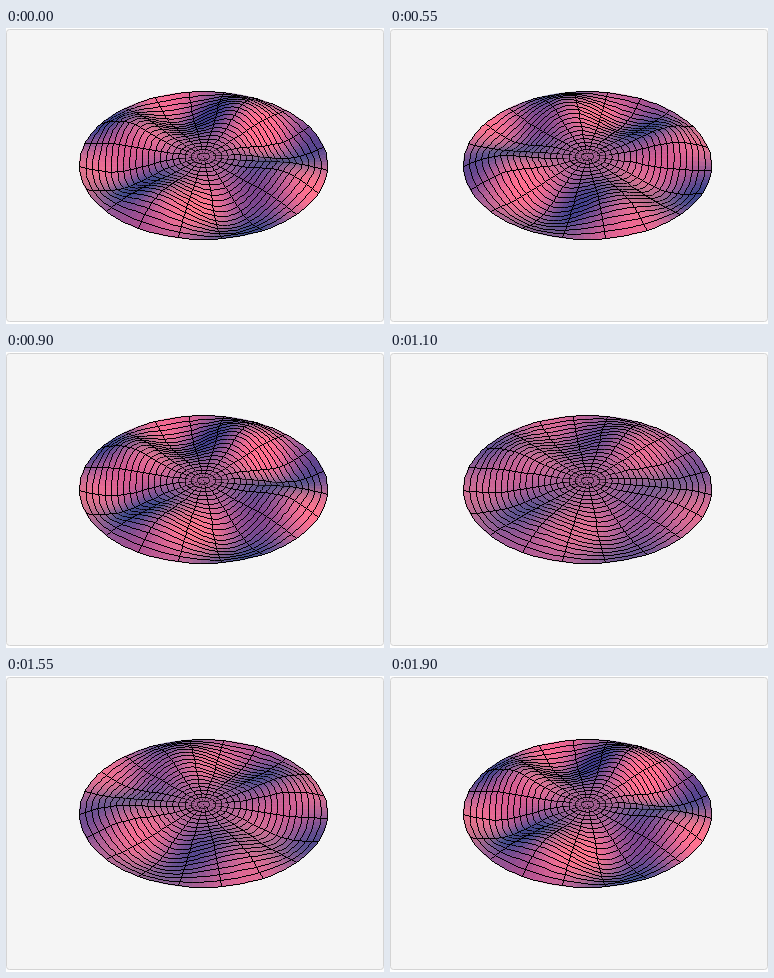
Animation of 378x296 px, one loop 1950 ms. Source, as an HTML page with a canvas:

```html
<!DOCTYPE html>
<html lang="en">
<head>
<meta charset="utf-8">
<title>Vibrating drum</title>
<style>
  html, body { margin: 0; width: 100%; height: 100%; overflow: hidden; background: #fff; }
  canvas { display: block; width: 378px; height: 296px; }
</style>
</head>
<body>
<canvas id="stage" width="378" height="296"></canvas>
<script>
const ctx = document.getElementById('stage').getContext('2d');
const RINGS = 20, SPOKES = 20, FINE = 6, SIDES = SPOKES * FINE;
const MODE = 4, ZERO = 7.5883, HEIGHT = 0.264;
const STEP = 50, STEPS = 39, PERIOD = 19;

// Camera
const CX = 197.5, CY = 128.7, SCALE = 123.1, DIST = 6.767;
const SIN = 0.591, COS = 0.8066;
const TURN = -28.44 * Math.PI / 180;

// Light directions: x right, y away from the viewer, z up
const unit = v => v.map(c => c / Math.hypot(...v));
const RED = unit([1, -COS, SIN]);
const GREEN = unit([1, SIN - COS, SIN + COS]);
const BLUE = unit([0, SIN - COS, SIN + COS]);

const dot = (a, b) => a[0] * b[0] + a[1] * b[1] + a[2] * b[2];
const sub = (a, b) => a.map((c, i) => c - b[i]);
const cross = (a, b) => [
  a[1] * b[2] - a[2] * b[1],
  a[2] * b[0] - a[0] * b[2],
  a[0] * b[1] - a[1] * b[0]
];

function bessel(n, x) {
  const N = 64;
  let sum = 0;
  for (let i = 0; i < N; i++) {
    const a = (i + 0.5) * Math.PI / N;
    sum += Math.cos(n * a - x * Math.sin(a));
  }
  return sum / N;
}

const profile = Array.from({ length: RINGS + 1 },
  (_, i) => HEIGHT * bessel(MODE, ZERO * i / RINGS));

function vertex(i, j, amp) {
  const r = i / RINGS, a = j * 2 * Math.PI / SIDES;
  return [
    r * Math.cos(a + TURN),
    r * Math.sin(a + TURN),
    amp * profile[i] * Math.cos(MODE * a)
  ];
}

const depth = p => 1 + (p[1] * COS - p[2] * SIN) / DIST;

function project(p) {
  const s = SCALE / depth(p);
  return [CX + s * p[0], CY - s * (p[1] * SIN + p[2] * COS)];
}

function shade(n) {
  const lit = d => Math.max(0, dot(n, d));
  const r = 62 + 246 * lit(RED), g = 20 + 96 * lit(GREEN), b = 70 + 79 * lit(BLUE);
  return `rgb(${[r, g, b].map(c => Math.min(255, Math.round(c)))})`;
}

function buildFaces(amp) {
  const faces = [];
  for (let i = 0; i < RINGS; i++) {
    for (let j = 0; j < SIDES; j++) {
      const q = [
        vertex(i, j, amp), vertex(i + 1, j, amp),
        vertex(i + 1, j + 1, amp), vertex(i, j + 1, amp)
      ];
      const n = unit(cross(sub(q[2], q[0]), sub(q[3], q[1])));
      const far = q.reduce((s, p) => s + depth(p), 0);
      faces.push({ pts: q.map(project), color: shade(n), far, j });
    }
  }
  return faces.sort((a, b) => b.far - a.far);
}

// Adds a one-pixel line without smoothing to the current path
function pixelLine(p, q) {
  const [x, y] = p.map(Math.floor);
  const dx = Math.floor(q[0]) - x, dy = Math.floor(q[1]) - y;
  const n = Math.max(Math.abs(dx), Math.abs(dy), 1);
  for (let k = 0; k <= n; k++) {
    ctx.rect(x + Math.round(dx * k / n), y + Math.round(dy * k / n), 1, 1);
  }
}

function drawFace({ pts, color, j }) {
  const [a, b, c, d] = pts;
  ctx.beginPath();
  pts.forEach(p => ctx.lineTo(p[0], p[1]));
  ctx.closePath();
  ctx.fillStyle = ctx.strokeStyle = color;
  ctx.fill();
  ctx.stroke();

  ctx.beginPath();
  pixelLine(a, d);
  pixelLine(b, c);
  if (j % FINE === 0) pixelLine(a, b);
  if ((j + 1) % FINE === 0) pixelLine(d, c);
  ctx.fillStyle = '#000';
  ctx.fill();
}

function drawPanel() {
  ctx.fillStyle = '#fff';
  ctx.fillRect(0, 0, 378, 296);
  ctx.beginPath();
  ctx.roundRect(0.5, 1.5, 377, 292, 3);
  ctx.fillStyle = '#f5f5f5';
  ctx.fill();
  ctx.strokeStyle = '#d4d4d4';
  ctx.lineWidth = 1;
  ctx.stroke();
}

function draw(amp) {
  drawPanel();
  ctx.lineWidth = 0.6;
  ctx.lineJoin = 'round';
  buildFaces(amp).forEach(drawFace);
}

const start = performance.now();
let shown = -1;

function tick() {
  const k = Math.floor((performance.now() - start) / STEP) % STEPS;
  if (k !== shown) {
    shown = k;
    draw(Math.cos(2 * Math.PI * k / PERIOD));
  }
  requestAnimationFrame(tick);
}
tick();
</script>
</body>
</html>
```
